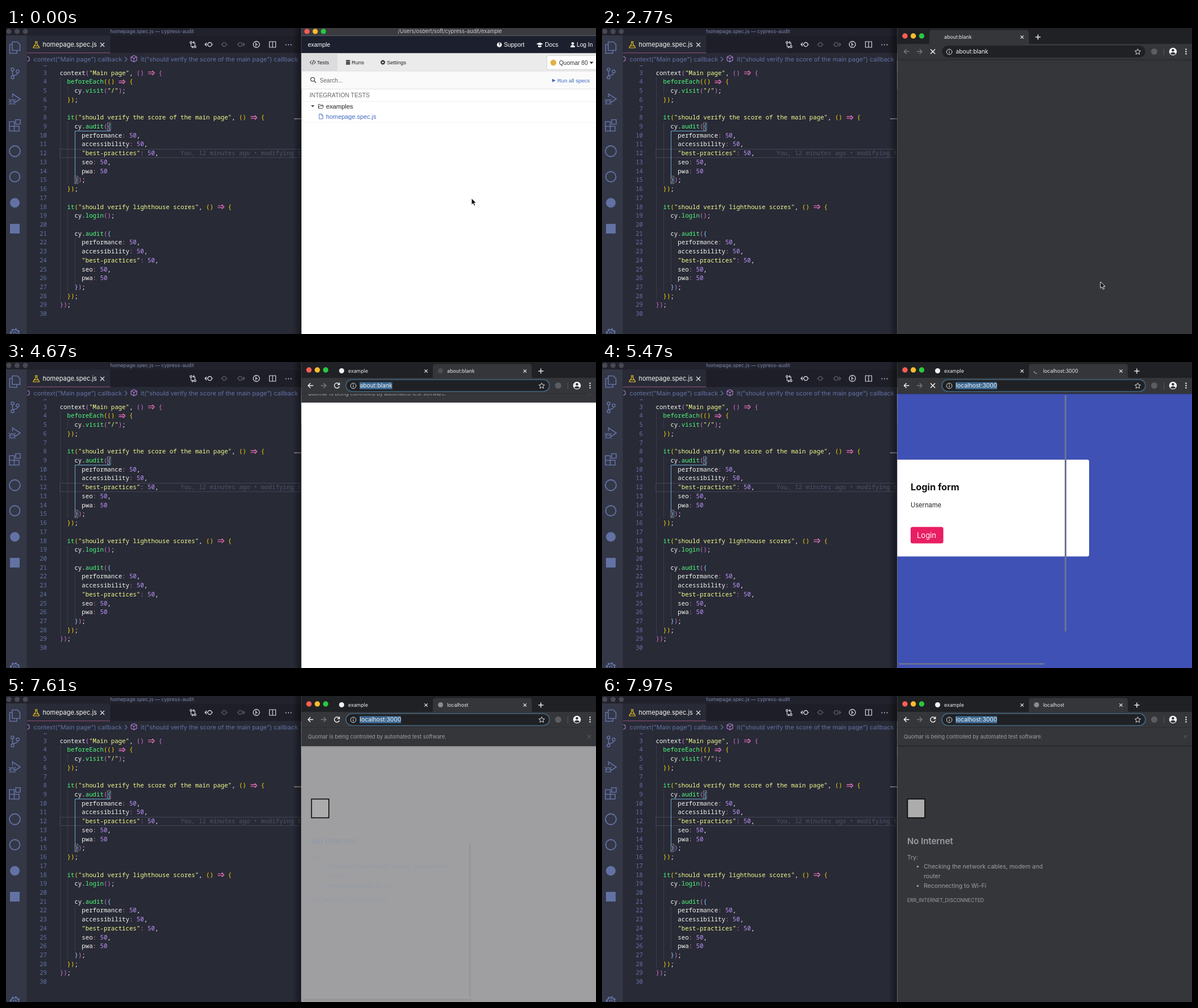
Animation, 1038 px wide and 539 px high, one loop 8000 ms. Source, as an HTML page:

```html
<!DOCTYPE html>
<html lang="en">
<head>
<meta charset="utf-8">
<title>Editor and test runner</title>
<style>
html, body { margin: 0; width: 100%; height: 100%; overflow: hidden; background: #282a36; }
svg { display: block; width: 1038px; height: 539px; font-family: Inter, "Open Sans", sans-serif; }
text { white-space: pre; }
.mono { font-family: "Noto Sans Mono", "DejaVu Sans Mono", monospace; font-size: 10.73px; font-weight: 500; }
.arial { font-family: "Liberation Sans", Arial, sans-serif; }
</style>
</head>
<body>
<svg id="stage" viewBox="0 0 1038 539"></svg>
<script>
const esc = s => s.replace(/&/g, '&amp;').replace(/</g, '&lt;');
const T = (x, y, size, s, fill, more = '') =>
  `<text x="${x}" y="${y + size * 0.36}" font-size="${size}" fill="${fill}" ${more}>${esc(s)}</text>`;
const A = (x, y, size, s, fill, more = '') => T(x, y, size, s, fill, 'class="arial" ' + more);
const R = (x, y, w, h, fill, more = '') => `<rect x="${x}" y="${y}" width="${w}" height="${h}" fill="${fill}" ${more}/>`;
const C = (x, y, r, fill, more = '') => `<circle cx="${x}" cy="${y}" r="${r}" fill="${fill}" ${more}/>`;
const P = (d, stroke, w = 1.3, more = '') => `<path d="${d}" fill="none" stroke="${stroke}" stroke-width="${w}" ${more}/>`;
const F = (d, fill, more = '') => `<path d="${d}" fill="${fill}" ${more}/>`;
const G = (id, s, more = '') => `<g id="${id}" ${more}>${s}</g>`;
const ring = (x, y, r, color, w = 1.3) => C(x, y, r, 'none', `stroke="${color}" stroke-width="${w}"`);
const cross = (x, y, r, color, w = 1.3, more = '') =>
  P(`M${x - r} ${y - r}l${2 * r} ${2 * r}m0 ${-2 * r}l${-2 * r} ${2 * r}`, color, w, more);
const lights = (x, y, gap, r, colors) => colors.map((c, i) => C(x + i * gap, y, r, c)).join('');
const MAC = ['#fc5d57', '#fdbc2e', '#28c840'];

// ---------- editor ----------
const CH = 6.44, LINE = 15.72, LEFT = 94.7, rowY = n => 79 + (n - 3) * LINE;
const SOURCE = `context("Main page", () => {
  beforeEach(() => {
    cy.visit("/");
  });

  it("should verify the score of the main page", () => {
    cy.audit({
      performance: 50,
      accessibility: 50,
      "best-practices": 50,
      seo: 50,
      pwa: 50
    });
  });

  it("should verify lighthouse scores", () => {
    cy.login();

    cy.audit({
      performance: 50,
      accessibility: 50,
      "best-practices": 50,
      seo: 50,
      pwa: 50
    });
  });
});
`.split('\n');

function codeLine(line, i) {
  const y = rowY(i + 3), indent = line.search(/\S|$/);
  let arrow = '';
  const spans = line.replace(/"[^"]*"|\d+|=>|[(){}]|:|\w+|[^\w]/g, (tok, at) => {
    let color = '#f8f8f2';
    if (tok === '=>') {
      const x = LEFT + at * CH + 0.8;
      arrow = P(`M${x} ${y - 1.5}h9.5m-9.5 3.2h9.5M${x + 7.3} ${y - 3.8}l3.8 3.9l-3.8 3.9`, '#ff79c6', 1.1);
      return '  ';
    }
    if (tok[0] === '"') color = '#f1fa8c';
    else if (/^\d/.test(tok)) color = '#bd93f9';
    else if (tok === ':') color = '#ff79c6';
    else if (/^(beforeEach|it|audit|visit|login)$/.test(tok)) color = '#50fa7b';
    else if (/[(){}]/.test(tok))
      color = indent === 2 ? '#ffd700' : indent === 4 && /[{}]/.test(tok) ? '#87cefa' : '#da70d6';
    return `<tspan fill="${color}">${tok}</tspan>`;
  });
  return `<text class="mono" x="${LEFT}" y="${y + 3.7}">${spans}</text>` + arrow;
}

const dim = '#6272a4', pale = '#d5d7e0';
const cube = x => P(`M${x} 48.5l5 2.6v6l-5 2.6l-5 -2.6v-6zm-5 2.6l5 2.6l5 -2.6m-5 2.6v6`, '#b180d7', 1.1);

const activityBar = R(0, 13, 36.5, 526, '#343746') +
  P('M11 24.5h9l4.5 4.5v10.5h-13.5zM11 29h-4.500v15.500h12.500v-5', dim, 1.6) +
  ring(11.5, 73, 2.6, dim, 1.5) + ring(11.5, 87, 2.6, dim, 1.5) + ring(20.5, 76.5, 2.6, dim, 1.5) +
  P('M11.500 75.700v8.700M20.500 79.200q0 4 -9 4.500', dim, 1.5) +
  P('M11.500 122v-6l13.500 9l-9.500 6.500', dim, 1.6) + ring(11, 130, 4, dim, 1.5) +
  P('M7 127l-2 -2m10 2l2 -2M7 130h-2.500m10.500 0h2.500M7.500 133l-2 2m9 -2l2 2M7 129h8', dim, 1.2) +
  P('M6 165h8.500v16.500h-8.500zM6 173.300h17v8.200h-8.500M17 161.500h8v8h-8z', dim, 1.6) +
  ring(15.5, 217, 9.5, dim, 1.8) + ring(15.5, 262, 9, dim, 1.8) + C(15.5, 308, 8.5, dim) + R(7, 345, 17, 17, dim) +
  C(15.5, 538, 7.5, 'none', `stroke="${dim}" stroke-width="3" stroke-dasharray="3.4 2.49"`) + ring(15.5, 538, 6.5, dim, 1.5) + ring(15.5, 538, 2.5, dim);

const toolIcons =
  ring(325.500, 25.500, 1.700, pale) + ring(332.500, 33, 1.700, pale) +
  P('M325.500 27v5q0 1.500 2 1.500h1.500m-1.500 -2l2 2l-2 2M332.500 31v-4q0 -1.500 -2 -1.500h-1m1.500 -2l-2 2l2 2', pale, 1.1) +
  ring(358.500, 29, 3.500, pale) + P('M355 29h-4.500m2.500 -3l-3 3l3 3M362 29h2', pale, 1.2) +
  ring(384, 29, 3.300, '#5a5c68') + P('M378 29h2.500m7 0h3', '#5a5c68', 1.2) +
  ring(412, 29, 3.300, '#5a5c68') + P('M406.500 29h2m7 0h4m-2.500 -3l3 3l-3 3', '#5a5c68', 1.2) +
  ring(440.500, 29, 5.500, pale) + P('M439.500 25.500v7M440 28l2.500 2', pale, 1.2) +
  P('M463.500 24h11v10h-11zM469 24v10', pale, 1.2) +
  [492.500, 497, 501.500].map(x => C(x, 29.500, 0.9, pale)).join('');

const editor = R(0, 0, 520, 539, '#282a36') + R(0, 0, 520, 13.500, '#21222c') +
  lights(5, 6, 14.500, 4.500, ['#464852', '#464852', '#464852']) +
  T(257, 6, 8.8, 'homepage.spec.js — cypress-audit', '#7c86ad', 'text-anchor="middle"') +
  R(36.500, 13.500, 483.500, 30.500, '#1d1e27') + R(37, 13.500, 146.500, 30.500, '#282a36') + R(37, 43.300, 146.500, 1, '#94527e') +
  P('M51 24h4.500m-3.500 0v4l-4 6q-.5 1 1 1h8.500q1.500 0 1 -1l-4 -6v-4M50 31.500h6.500', '#f2c522', 1.2) +
  T(64.500, 29.500, 11, 'homepage.spec.js', '#f8f8f2') + cross(169.500, 29.500, 3.500, '#e6e6e6', 1.2) + toolIcons +
  P('M37.500 50l3.500 2v5l-3.500 2', '#b180d7', 1.1) + T(48.500, 55, 10.85, 'context("Main page") callback', dim) +
  P('M209 51l4 4l-4 4', dim, 1.2) + cube(225) +
  T(237, 55, 10.85, 'it("should verify the score of the main page") callback', dim) +
  R(95, 213.500, 430, 14.800, 'none', 'stroke="#44475a"') +
  [[95, 86, 480], [108, 102, 117], [108, 165, 275], [108, 322, 465], [121, 370, 449]]
    .map(([x, a, b]) => P(`M${x}.5 ${a}V${b}`, '#41434f', 0.8)).join('') +
  P('M184 181.500H121.500V261', '#6fa8c9', 1) +
  R(178.500, 167, 5.500, 13, 'none', 'stroke="#8a8c94" stroke-width=".9"') +
  R(121, 261, 5.500, 13, 'none', 'stroke="#8a8c94" stroke-width=".9"') +
  SOURCE.map(codeLine).join('') +
  SOURCE.map((_, i) => `<text class="mono" x="72" y="${rowY(i + 3) + 3.7}" fill="${dim}" text-anchor="end">${i + 3}</text>`).join('') +
  P('M66.500 66.500h5', dim, 1) +
  `<text class="mono" x="307" y="${rowY(12) + 3.7}" fill="#4f5369">You, 12 minutes ago • modifying t</text>` +
  R(507, 159, 13, 1.800, '#8a8c94') + activityBar + R(504, 0, 16, 539, 'url(#edge)');

// ---------- test launcher ----------
const link = '#4169c0';
const launcher = R(519.500, 0, 519, 539, '#fff') + R(519.500, 0, 519, 13.500, '#3b3b3f') + lights(529.500, 6, 14.500, 4.600, MAC) +
  T(781, 6, 9.2, '/Users/osbert/soft/cypress-audit/example', '#cfcfd2', 'text-anchor="middle"') +
  R(519.500, 13.500, 519, 31, '#1c1f2e') + A(531, 29.500, 10.4, 'example', '#fff') +
  C(868, 29.500, 4.300, '#fff') + T(866, 29.500, 7, '?', '#1c1f2e', 'font-weight="800"') + A(876, 29.500, 10.3, 'Support', '#fff') +
  F('M933 28l6 -2.500l6 2.500l-6 2.500zM936 30.500l3 1.200l3 -1.200v2.500q-3 1.800 -6 0z', '#fff') + A(948, 29.500, 10.4, 'Docs', '#fff') +
  C(997, 27.300, 2.300, '#fff') + F('M993 34q0 -4 4 -4t4 4z', '#fff') + A(1004, 29.500, 10.2, 'Log In', '#fff') +
  R(519.500, 44.500, 519, 31.500, '#ebebec') + R(519.500, 44.500, 63.500, 31.500, '#dcdcde') +
  P('M537.500 57.500l-2.500 3l2.500 3m4.500 -6l2.500 3l-2.500 3m-3 1l2 -8', '#333', 1.1) + A(547, 60.500, 9.1, 'Tests', '#222') +
  R(598, 56.500, 7.500, 2.300, '#333', 'rx="1"') + R(598, 59.400, 7.500, 2.300, '#333', 'rx="1"') + R(598, 62.300, 7.500, 2.300, '#333', 'rx="1"') +
  A(608, 60.500, 9.4, 'Runs', '#222') + ring(663, 60.500, 2.500, '#333', 1.9) +
  C(663, 60.500, 3.900, 'none', 'stroke="#333" stroke-width="1" stroke-dasharray="1.600 1.460"') + A(670, 60.500, 9.4, 'Settings', '#222') +
  R(951.500, 48.500, 92, 24.500, '#fff', 'rx="3" stroke="#ccc" stroke-width=".8"') + C(963, 61, 5.200, '#e2b13c') +
  A(973, 61, 10.1, 'Quomar 80', '#333') + F('M1026.500 59.500h7l-3.500 4z', '#333') +
  R(519.500, 76, 519, 31.500, '#fafafa') + R(519.500, 75.500, 519, 0.8, '#d8d8d8') + R(519.500, 107, 519, 0.8, '#ddd') +
  ring(539.500, 90.500, 3.400, '#555', 1.4) + P('M542 93l3.500 3.500', '#555', 1.6) + A(552, 92, 10.1, 'Search...', '#666') +
  G('runAll', F('M961 89.500l6 3l-6 3z', 'currentColor') + A(970, 92.500, 9.5, 'Run all specs', 'currentColor')) +
  A(534, 118.500, 10.35, 'INTEGRATION TESTS', '#666') + R(519.500, 129, 519, 0.7, '#e8e8e8') + R(519.500, 166, 519, 0.7, '#eee') +
  F('M536.500 136h6l-3 3.500z', '#444') + P('M549.500 141.500v-7h3l1 1.200h4v1.500m-8 4.300l1.800 -4.300h7.500l-1.800 4.300z', '#555', 1) +
  A(563, 138, 11.1, 'examples', '#444', 'font-weight="500" stroke="#444" stroke-width=".2"') +
  G('spec', P('M551 151.500h4l2.500 2.500v6h-6.500zM555 151.500v2.500h2.500', 'currentColor', 0.9) + A(563, 156, 10.9, 'homepage.spec.js', 'currentColor'));

// ---------- browser pages, laid out below the notice bar ----------
const blank = G('blank', R(519.500, 88, 519, 500, '#fff'));

const preview = A(943, 137.500, 10.6, '1000 x 660', '#777') + A(1001, 137.500, 9, '(32%)', '#888') +
  C(1034.500, 137, 4.200, '#666') + R(1033.900, 136, 1.200, 3.300, '#fff') + R(1033.900, 134, 1.200, 1.200, '#fff') +
  R(811, 153, 228, 153, '#fff') + R(815.500, 157, 223, 85.500, '#e8e8e9') +
  F('M919.500 176.500l7.500 -6.500l7.500 6.500l-1 1.200l-1.300 -1.100v5.400h-3.700v-4h-3v4h-3.700v-5.400l-1.300 1.100z', '#222') + R(930.500, 170.500, 2, 4, '#222') +
  T(927, 190, 4.4, 'This is the default blank page.', '#555', 'text-anchor="middle"') +
  T(927, 200, 4.4, 'To test your web application:', '#555', 'text-anchor="middle"') +
  R(902, 207, 50.500, 26.500, '#d2d2d4') + R(910, 217.500, 20, 5, '#777') +
  ["1. Start your app's server", '2. cy.visit()  your app', '3. Begin writing tests'].map((s, i) => T(907, 214 + i * 6, 3.2, s, '#222')).join('') +
  R(811, 152.500, 228, 0.7, '#ccc') + R(811, 306, 228, 260, '#999') + R(811, 306, 228, 260, 'url(#hatch)') + R(811, 305.500, 228, 1.500, '#777');

const runner = G('runner', R(519.500, 88, 291.500, 470, '#f4f4f4') + R(519.500, 88, 291.500, 33.500, '#fdfdfd') +
  R(519.500, 121, 291.500, 0.8, '#ccc') + [572, 694, 718].map(x => R(x, 88, 0.8, 33, '#ddd')).join('') +
  P('M533.500 100.500l-4 4l4 4', '#333', 1.7) + T(538, 104.500, 9.6, 'Tests', '#333') +
  P('M584 104.500l3.500 3.500l7 -7.500', '#1fa971', 2.5) + T(599, 104.500, 9, '--', '#1fa971') +
  cross(629, 104.500, 3.500, '#e94f47', 2.4) + T(637, 104.500, 9, '--', '#e94f47') +
  C(669, 104.500, 5, 'none', 'stroke="#999" stroke-width="1.3" stroke-dasharray="28 3.400"') + T(678.500, 104.500, 9, '--', '#999') +
  T(702, 104.500, 9, '--', '#333') + C(750.500, 104.500, 4, '#fdb022') +
  P('M763 100v9m-2.300 -6.500l2.300 -2.500l2.300 2.500m-4.600 4l2.300 2.500l2.300 -2.500', '#222', 1.4) +
  P('M796 102a4.300 4.300 0 1 0 .4 3.800M796.800 98.800v3.800h-3.800', '#222', 1.5) +
  R(811, 88, 228, 470, '#fafafa') + R(810.300, 88, 0.9, 470, '#bbb') +
  ring(831.500, 104, 3.600, '#777', 1.1) + P('M831.500 98.500v3m0 5v3M826 104h3m5 0h3', '#777', 1.1) +
  R(852.500, 95.500, 187, 18, '#fff', 'rx="9" stroke="#c4c4c4" stroke-width=".8"') + G('preview', preview));

const login = G('login', R(519.500, 55, 519, 500, '#3f51b5') + R(515, 172, 342, 170.500, '#fff', 'rx="3.500"') +
  T(543, 220.500, 16.3, 'Login form', '#111', 'font-weight="700"') + T(543, 252, 11.1, 'Username', '#222') +
  R(543, 290.500, 57.500, 29, '#e91e63', 'rx="3.500"') + T(554, 305, 13, 'Login', '#fff') +
  G('bars', R(814, 58, 3, 417, '#70748f', 'rx="1.500"') + R(522, 530.500, 257, 2.500, '#70748f', 'rx="1.200"')),
  'transform="translate(0 32.500)"');

const words = [[537, 284, 10.3, 'Try:'], [566, 300.500, 10.5, 'Checking the network cables, modem and'],
  [566, 317.500, 10.5, 'router'], [566, 334.500, 10.5, 'Reconnecting to Wi-Fi'], [537, 360, 8.65, 'ERR_INTERNET_DISCONNECTED']];
const offline = G('offline', G('shade', R(519.500, 88, 519, 500, 'currentColor')) +
  R(537.500, 181.500, 30.500, 33, '#acacac', 'stroke="#000" stroke-width="1.500"') +
  G('words', T(537, 255.500, 14.9, 'No Internet', 'currentColor', 'font-weight="600"') +
    words.map(([x, y, s, w]) => T(x, y, s, w, 'currentColor')).join('') +
    C(555.500, 300.500, 1.7, 'currentColor') + C(555.500, 334.500, 1.7, 'currentColor')));

const notice = R(519.500, 55.500, 519, 32, '#35363a') +
  T(531, 72, 9.3, 'Quomar is being controlled by automated test software.', '#9aa0a6') + cross(1026, 71.500, 2.800, '#54565b', 1.1) +
  R(519.500, 87.300, 519, 1.300, '#000', 'opacity=".3"') + R(519.500, 88.600, 519, 1.500, '#000', 'opacity=".1"');

// ---------- browser frame ----------
const frame = R(519.500, 0, 519, 28.500, '#202124') + lights(533, 14, 14.700, 4.700, MAC) +
  `<path id="tab" fill="#35363a"/>` + R(519.500, 28, 519, 27.500, '#35363a') + R(519.500, 55, 519, 0.8, '#2a2b2e') +
  G('fav1', C(590.500, 15.500, 4.500, '#f1f1f1')) + T(602, 16, 8.75, '', '#e8eaed', 'id="title1"') + cross(739, 16, 2.700, '#e8eaed', 1.2) +
  G('tab2', C(764.500, 15.500, 4.500, '#5f6368', 'id="fav2"') + P('M764.500 11a4.500 4.500 0 0 1 4.500 4.500', '#a5a8ad', 1.3, 'id="spin"') +
    T(776, 16, 8.75, '', '#e8eaed', 'id="title2"') + cross(913, 16, 2.700, '#e8eaed', 1.2)) +
  G('plus', P('M762.500 16h9m-4.500 -4.500v9', '#e8eaed', 1.5)) +
  G('back', P('M540.500 41.500h-9m4.200 -4.200l-4.200 4.200l4.200 4.200', 'currentColor', 1.4)) +
  P('M554 41.500h9m-4.200 -4.200l4.200 4.200l-4.200 4.200', '#77797e', 1.4) +
  G('stop', cross(582, 41.500, 4, '#f1f3f4', 1.5)) +
  G('reload', P('M586 39a4.500 4.500 0 1 0 .5 4M586.700 36.500v3.500h-3.500', '#f1f3f4', 1.4)) +
  R(598, 31, 358, 21, '#202124', 'rx="10.500" id="box"') + ring(611, 42, 4.800, '#dfe1e5', 1) + P('M611 41.500v3m0 -5.500v1.200', '#dfe1e5', 1.2) +
  R(622, 35.500, 73, 12.500, '#3d6a94', 'id="mark"') + T(622.500, 41.500, 10.3, '', '#f1f3f4', 'id="url"') +
  P('M942.500 36.800l1.500 3.200l3.500 .4l-2.600 2.400l.7 3.500l-3.100 -1.800l-3.100 1.800l.7 -3.500l-2.600 -2.400l3.500 -.4z', '#dfe1e5', 1) +
  C(971.500, 41.500, 5.500, '#5b5d62') + R(988, 36, 0.8, 12, '#606367') +
  C(1004.500, 41.500, 6.800, '#f1f3f4') + C(1004.500, 39.300, 2.200, '#35363a') + F('M1000 45.500q1 -2.800 4.500 -2.800t4.500 2.800q-4.500 3 -9 0z', '#35363a') +
  [37.500, 41.500, 45.500].map(y => C(1027.500, y, 1.2, '#f1f3f4')).join('');

const browser = G('browser', R(519.500, 0, 519, 539, '#35363a') +
  G('content', blank + runner + login + offline +
    G('lowBars', R(522, 533, 297, 4, '#777', 'rx="2"') + R(814.500, 260, 3.500, 270, '#777', 'rx="1.700"')) + notice) + frame);

const pointer = G('pointer', F('M0 0v11.500l2.700 -2.500l1.900 4.300l2 -.9l-1.900 -4.200h3.600z', '#111', 'stroke="#fff" stroke-width=".9"'));

const stage = document.getElementById('stage');
stage.innerHTML = `<defs>
  <linearGradient id="edge"><stop offset="0" stop-opacity="0"/><stop offset="1" stop-opacity=".45"/></linearGradient>
  <pattern id="hatch" width="4" height="4" patternUnits="userSpaceOnUse"><path d="M-1 1l2 -2M0 4l4 -4M3 5l2 -2" stroke="#898989" stroke-width="1"/></pattern>
  <clipPath id="right"><path d="M519.500 0H1038V539H519.500z"/></clipPath></defs>` +
  editor + `<g clip-path="url(#right)">${launcher}${browser}</g>` + pointer;

// ---------- motion ----------
const el = {};
stage.querySelectorAll('[id]').forEach(n => el[n.id] = n);
const set = (id, name, v) => el[id].setAttribute(name, v);
const show = (id, on) => el[id].style.display = on ? '' : 'none';
const ramp = (t, a, b) => Math.min(1, Math.max(0, (t - a) / (b - a)));
const ease = u => u * u * (3 - 2 * u);
const mix = (a, b, u) => a + (b - a) * u;
const rgb = (a, b, u) => `rgb(${a.map((v, i) => Math.round(mix(v, b[i], u)))})`;
const pick = (t, steps) => steps.reduce((v, [at, s]) => t >= at ? s : v, '');

const PATH = [[450, 819, 300], [720, 642, 157], [930, 850, 60], [1060, 975, 33], [1200, 986, 90],
  [1290, 986, 90], [1640, 990, 94], [1810, 990, 94], [2540, 877, 447]];
function pointerAt(t) {
  for (let i = 1; i < PATH.length; i++) {
    const [a, x, y] = PATH[i - 1], [b, x2, y2] = PATH[i];
    if (t < b) { const u = ease(ramp(t, a, b)); return [mix(x, x2, u), mix(y, y2, u)]; }
  }
  return [877, 447];
}

function noticeAt(t) {
  if (t < 4410) return ramp(t, 2890, 3150);
  if (t < 5210) return ease(ramp(t, 4500, 4850));
  return t < 6720 ? ease(ramp(t, 5650, 6010)) : 1;
}

const ADDRESS = [[0, 'about:blank'], [2890, 'localhost:3000/__/#/tests/__all'], [4410, 'about:blank'],
  [5210, 'localhost:3000'], [6720, 'about:blank'], [6890, 'localhost:3000']];

function draw(t) {
  const [px, py] = pointerAt(t);
  set('pointer', 'transform', `translate(${px} ${py})`);
  show('pointer', t < 3060);
  const over = (x, y, w, h) => px > x && px < x + w && py > y && py < y + h;
  el.spec.style.color = over(551, 148, 102, 16) ? '#1d3f8f' : link;
  el.runAll.style.color = over(960, 84, 68, 16) ? '#1d3f8f' : link;

  const open = ease(ramp(t, 2360, 2540)), scale = mix(0.7, 1, open);
  show('browser', t >= 2360);
  set('browser', 'opacity', open);
  set('browser', 'transform', `translate(779 270) scale(${scale}) translate(-779 -270)`);

  const two = t >= 4410, grow = ease(ramp(t, 4410, 4590));
  const x = two ? 751 : 576, w = two ? Math.max(12, 174 * grow) : 175;
  set('tab', 'd', `M${x - 4} 28.500q4 0 4 -4v-16q0 -5 5 -5h${w - 10}q5 0 5 5v16q0 4 4 4z`);
  set('plus', 'transform', `translate(${two ? 174 * grow : 0})`);
  show('tab2', grow > 0.9);
  show('fav1', t >= 3330);
  el.title1.textContent = pick(t, [[0, 'about:blank'], [2890, 'localhost:3000'], [3330, 'example']]);
  el.title2.textContent = pick(t, [[4410, 'about:blank'], [5210, 'localhost:3000'], [6720, 'about:blank'], [6980, 'localhost']]);

  const loading = t < 3330 || t >= 5210 && t < 6010 || t >= 6810 && t < 7070;
  show('stop', loading);
  show('reload', !loading);
  show('spin', loading);
  set('spin', 'transform', `rotate(${t * 0.36} 764.500 15.500)`);
  set('fav2', 'fill', loading ? 'none' : t >= 6980 ? '#8a8d92' : '#4c4e53');
  el.back.style.color = t < 2890 ? '#77797e' : '#f1f3f4';

  const url = pick(t, ADDRESS);
  el.url.textContent = url;
  show('mark', two);
  set('mark', 'width', url === 'about:blank' ? 57.5 : 73);
  set('box', 'stroke', two ? '#41657f' : 'none');
  set('box', 'stroke-width', 1.6);

  set('content', 'transform', `translate(0 ${(noticeAt(t) - 1) * 32.5})`);
  show('blank', t >= 3060);
  show('runner', t >= 3510 && t < 4410);
  show('preview', t >= 3600);
  show('login', t >= 5380 && t < 6720);
  set('bars', 'opacity', 1 - ramp(t, 5650, 6010));
  set('lowBars', 'opacity', 0.35 * ramp(t, 7160, 7340) * (1 - ramp(t, 7480, 7750)));

  const dark = 1 - (1 - ramp(t, 7500, 7970)) ** 2.4;
  show('offline', t >= 7520);
  el.shade.style.color = rgb([255, 255, 255], [53, 54, 58], dark);
  el.words.style.color = rgb([140, 148, 164], [154, 160, 166], dark);
}

function tick(now) {
  draw(now % 8000);
  requestAnimationFrame(tick);
}
draw(0);
requestAnimationFrame(tick);
</script>
</body>
</html>
```
